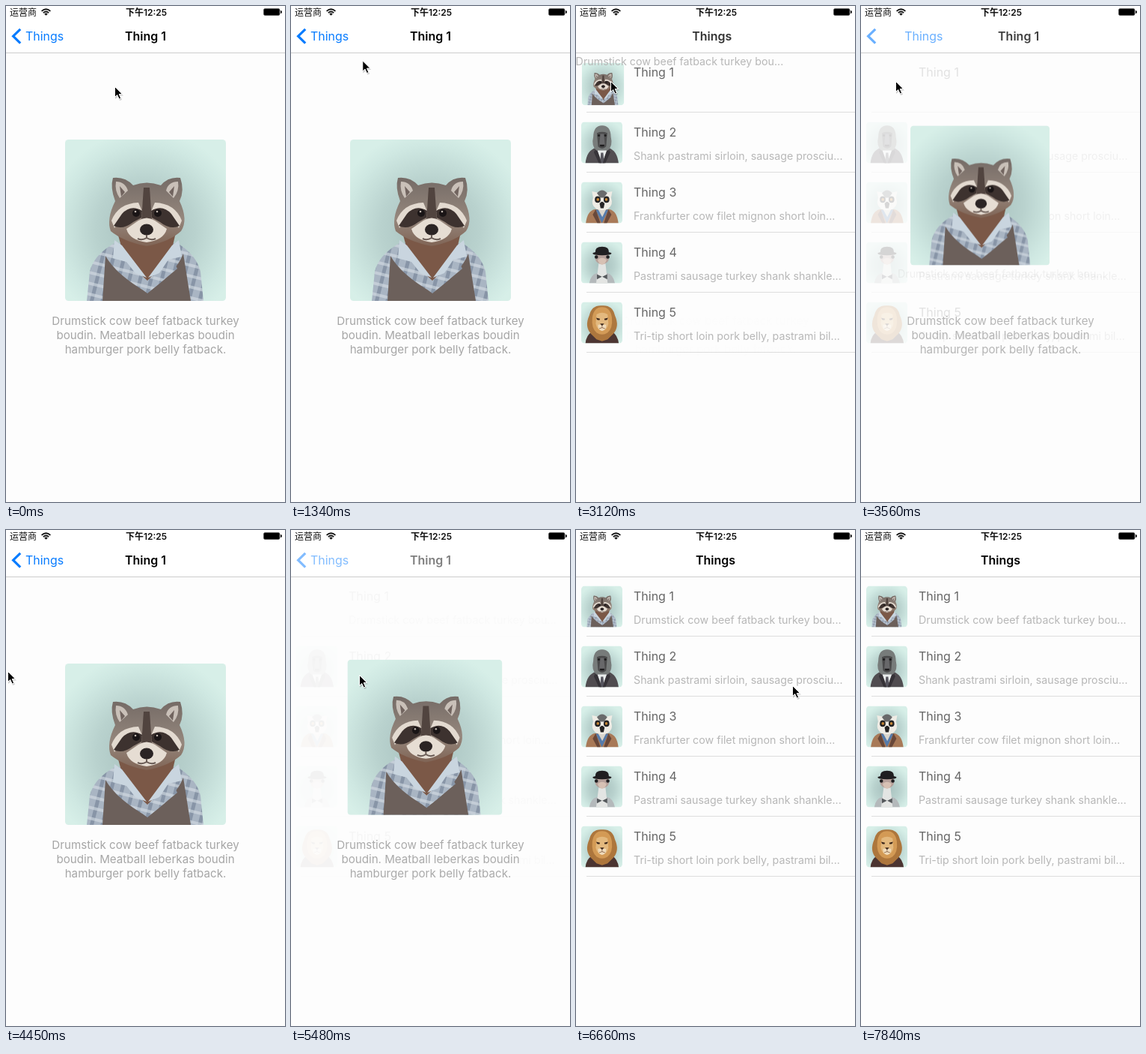
Animation of 373x661 px, one loop 8130 ms. Source, as an HTML page:

```html
<!DOCTYPE html>
<html lang="zh">
<head>
<meta charset="utf-8">
<title>Things</title>
<style>
html, body { margin: 0; width: 100%; height: 100%; overflow: hidden; background: #fdfdfd; }
svg { display: block; }
text { font-family: Inter, "Noto Sans CJK SC", "Noto Sans CJK", sans-serif; white-space: pre; }
.status { font-size: 12px; fill: #111; }
.title { font-size: 16px; font-weight: 600; text-anchor: middle; }
.name { font-size: 16px; fill: #666; }
.sub { font-size: 14.25px; fill: #b7b7b7; }
.desc { font-size: 15.15px; fill: #a6a6a6; text-anchor: middle; }
</style>
</head>
<body>
<svg id="stage" width="373" height="661" viewBox="0 0 373 661">
  <defs>
    <radialGradient id="mint" cx=".5" cy=".56" r=".62">
      <stop offset="0" stop-color="#a5bebc"/>
      <stop offset=".5" stop-color="#b9d2ce"/>
      <stop offset=".85" stop-color="#cfe8e2"/>
      <stop offset="1" stop-color="#d7efe8"/>
    </radialGradient>
    <linearGradient id="fur" x2="0" y2="1">
      <stop offset="0" stop-color="#756b66"/>
      <stop offset=".6" stop-color="#95877d"/>
      <stop offset="1" stop-color="#806455"/>
    </linearGradient>
    <pattern id="plaid" width="14" height="14" patternUnits="userSpaceOnUse" patternTransform="rotate(14)">
      <path fill="#a9b5c3" d="M0 0H14V14H0Z"/>
      <path fill="#7b879b" d="M0 0H5V14H0Z" opacity=".7"/>
      <path fill="#d5dde4" d="M0 8H14V12H0Z" opacity=".6"/>
    </pattern>
    <clipPath id="heroClip"><rect id="heroBox" width="215" height="215"/></clipPath>
    <clipPath id="thumbClip"><rect width="215" height="215" rx="17"/></clipPath>

    <g id="raccoon">
      <path fill="url(#plaid)" d="M66 138Q38 154 33 176L29 215H185L181 176Q176 154 150 138Z"/>
      <path fill="#7b5847" d="M70 124H148L140 158L110 188L80 160Z"/>
      <path fill="#6c605b" d="M54 155Q68 180 110 204Q148 178 158 152L168 215H50Z"/>
      <path fill="url(#plaid)" d="M79 152L110 190L110 205L72 176ZM140 152L110 190V205L150 172Z"/>
      <path fill="#c9d5df" d="M66 134L76 141L109 184L94 178L82 163L64 158ZM152 134L143 141L111 184L126 178L138 160L156 156Z"/>
      <path fill="url(#fur)" d="M64 51Q80 49 91 61Q109 54 128 61Q138 49 154 51Q160 68 153 82Q165 107 155 122Q140 136 109 142Q78 136 61 122Q55 106 67 82Q60 64 64 51Z"/>
      <path fill="#c9c0b8" d="M68 56Q80 56 84 68L73 78Q66 68 68 56ZM151 56Q138 56 135 68L145 78Q153 68 151 56Z"/>
      <path fill="#71645f" d="M73 62L80 70L75 76ZM146 62L139 70L144 76Z"/>
      <path fill="#e3dad0" d="M62 108Q71 85 98 84L104 98Q80 92 66 118ZM156 108Q147 85 120 84L114 98Q138 92 152 118Z"/>
      <path fill="#3d322f" d="M103 95Q88 86 76 99L65 115Q77 121 91 110L102 104ZM115 95Q130 86 142 99L153 115Q141 121 127 110L116 104Z"/>
      <path fill="#51443f" d="M105 64H113L116 108H102Z"/>
      <path fill="#e6ddd3" d="M98 108Q109 101 120 108L136 119Q132 134 109 137Q86 134 82 119Z"/>
      <ellipse fill="#2b2424" cx="109" cy="120" rx="9" ry="7.5"/>
      <path fill="none" stroke="#695b55" stroke-width="2" d="M109 127V131Q103 135 97 132M109 131Q115 135 121 132"/>
      <g fill="#1a1516"><circle cx="95" cy="98" r="5"/><circle cx="124" cy="98" r="5"/></g>
      <g fill="#c3b9b0"><circle cx="94" cy="96" r="1.3"/><circle cx="123" cy="96" r="1.3"/></g>
    </g>

    <g id="baboon">
      <path fill="#504c50" d="M76 134Q28 148 22 215H195Q188 148 142 134Z"/>
      <path fill="#e9ecec" d="M80 136L109 215L138 136Z"/>
      <path fill="#55545d" d="M103 160H115L120 215H98Z"/>
      <path fill="#353237" d="M78 133L106 215H92L66 158ZM140 133L112 215H126L152 158Z"/>
      <path fill="#777b7a" d="M109 18Q154 18 155 78Q166 122 140 148H78Q52 122 63 78Q64 18 109 18Z"/>
      <path fill="#4a4a4b" d="M82 57Q109 46 136 57L130 128Q109 148 88 128Z"/>
      <path fill="#68686a" d="M100 62H118L124 122H94Z"/>
      <g fill="#1c1b1c"><circle cx="92" cy="70" r="6"/><circle cx="126" cy="70" r="6"/><path d="M96 118H122L118 128H100Z"/></g>
    </g>

    <g id="lemur">
      <path fill="#a87957" d="M70 142Q30 152 24 215H194Q188 152 148 142Z"/>
      <path fill="#567baa" d="M76 144L108 215L142 144Z"/>
      <path fill="#d9d5cd" d="M86 138H132L110 182Z"/>
      <path fill="#684739" d="M76 142L100 215H84L60 170ZM142 142L118 215H134L158 170Z"/>
      <path fill="#efece5" d="M56 48L84 54Q109 38 134 54L162 48L156 82Q170 120 139 140Q109 154 79 140Q48 120 62 82Z"/>
      <path fill="#696a6b" d="M82 58Q109 28 136 58L118 82H100Z"/>
      <g fill="#242223"><ellipse cx="86" cy="91" rx="15" ry="17"/><ellipse cx="132" cy="91" rx="15" ry="17"/><path d="M96 112Q109 92 122 112L117 136H101Z"/></g>
      <g fill="#c58535"><circle cx="87" cy="91" r="7"/><circle cx="131" cy="91" r="7"/></g>
    </g>

    <g id="ostrich">
      <path fill="#b4b9bb" d="M82 162Q48 170 42 215H176Q168 170 136 162Z"/>
      <path fill="#e3e5e3" d="M92 104H126L138 215H78Z"/>
      <path fill="#55595c" d="M108 180L82 168V194ZM110 180L136 168V194Z"/>
      <path fill="#b5a09a" d="M76 64H142Q152 92 134 106Q109 126 84 106Q66 92 76 64Z"/>
      <path fill="#d7c1b4" d="M86 92Q109 74 132 92Q126 116 109 118Q92 116 86 92Z"/>
      <g fill="#1f1e20"><circle cx="79" cy="78" r="9"/><circle cx="139" cy="78" r="9"/><path d="M73 57Q70 24 109 24Q148 24 145 57Z"/><ellipse cx="109" cy="59" rx="49" ry="10"/></g>
    </g>

    <g id="lion">
      <path fill="#4b3431" d="M56 155Q26 172 22 215H196Q190 172 162 155Z"/>
      <path fill="#ad763c" d="M109 18Q164 14 176 70Q202 126 167 166L138 194L109 204L80 194L51 166Q16 126 42 70Q54 14 109 18Z"/>
      <path fill="#d39a55" d="M109 26Q152 26 160 80Q166 138 137 160Q109 178 81 160Q52 138 58 80Q66 26 109 26Z"/>
      <path fill="#e3b97e" d="M80 64Q109 46 138 64L142 112Q136 146 109 150Q82 146 76 112Z"/>
      <path fill="#f0dcbc" d="M88 118H130Q132 146 109 150Q86 146 88 118Z"/>
      <g fill="#3a251a"><path d="M78 82L98 87L95 94L83 92ZM140 82L120 87L123 94L135 92ZM98 112H120L109 124Z"/></g>
      <path fill="none" stroke="#77513a" stroke-width="3" d="M109 124V133L94 138M109 133L124 138"/>
    </g>
  </defs>

  <path fill="#fdfdfd" d="M0 0H373V661H0Z"/>
  <g id="list"></g>
  <g id="detail" class="desc">
    <text class="desc" x="186.5" y="425">Drumstick cow beef fatback turkey</text>
    <text class="desc" x="186.5" y="444">boudin. Meatball leberkas boudin</text>
    <text class="desc" x="186.5" y="463">hamburger pork belly fatback.</text>
  </g>
  <g id="hero">
    <g clip-path="url(#heroClip)">
      <path fill="url(#mint)" d="M0 0H215V215H0Z"/>
      <use href="#raccoon"/>
    </g>
  </g>
  <text id="fly" class="sub">Drumstick cow beef fatback turkey bou...</text>

  <path fill="#fff" d="M0 0H373V62H0Z"/>
  <path fill="#cdcdcd" d="M0 62H373V63H0Z"/>
  <g id="back" fill="#087cff">
    <path fill="none" stroke="#087cff" stroke-width="3.2" d="M19.2 30.8L9.6 40.2L19.2 49.6"/>
    <text id="backLabel" x="26" y="46" font-size="15.9">Things</text>
  </g>
  <text id="thing" class="title" x="186.5" y="46">Thing 1</text>
  <text id="things" class="title" x="186.5" y="46">Things</text>

  <text class="status" x="5" y="12.5">运营商</text>
  <g fill="none" stroke="#111" stroke-width="1.8">
    <path d="M47.6 6.9Q53.5 1.6 59.4 6.9M49.8 9.2Q53.5 5.9 57.2 9.2"/>
    <path fill="#111" stroke="none" d="M51.2 10.4Q53.5 8.6 55.8 10.4L53.5 12.8Z"/>
  </g>
  <text class="status" x="187.5" y="12.5" text-anchor="middle" font-weight="600">下午12:25</text>
  <rect x="344.5" y="3.5" width="21.5" height="9" rx="1.8" fill="#000" stroke="#555" stroke-width=".7"/>
  <path fill="#111" d="M367 6Q369 6.2 369 8T367 10Z"/>

  <g id="cursor">
    <path fill="#000" opacity=".18" d="M1 2V17L4.5 14L7 19L10 18L7.6 12.5H12Z"/>
    <path fill="#000" stroke="#fff" stroke-width="1" d="M.5 .5V14.5L3.7 11.5L6.2 17L8.6 16L6.2 10.6H10.6Z"/>
  </g>
</svg>
<script>
const LOOP = 8130, STEP = 147.7, LEAD = 8;
const $ = id => document.getElementById(id);

const rows = [
  ['raccoon', 'Drumstick cow beef fatback turkey bou...'],
  ['baboon', 'Shank pastrami sirloin, sausage prosciu...'],
  ['lemur', 'Frankfurter cow filet mignon short loin...'],
  ['ostrich', 'Pastrami sausage turkey shank shankle...'],
  ['lion', 'Tri-tip short loin pork belly, pastrami bil...']
];

// The first picture is always the hero, so its row stays empty.
$('list').innerHTML = rows.map(([animal, sub], i) => `
  <g transform="translate(0 ${i * 80})">
    ${i ? `<g transform="translate(7 74.6) scale(${55 / 215})" clip-path="url(#thumbClip)">
      <path fill="url(#mint)" d="M0 0H215V215H0Z"/><use href="#${animal}"/></g>` : ''}
    <text class="name" x="77" y="94">Thing ${i + 1}</text>
    <text class="sub" x="77" y="125"${i ? '' : ' id="firstSub"'}>${sub}</text>
    <path fill="#dedede" d="M14 141H373V142H14Z"/>
  </g>`).join('');

// Each key is [step, value, ...]; 0 is the detail page, 1 the list.
const tracks = {
  page: [[0, 0], [12, 0], [13, .22], [14, .58], [15, .9], [16, 1], [20, 1], [21, .99], [22, .85],
    [23, .5], [24, .18], [25, .04], [26, 0], [33, 0], [37, .05], [38, .16], [41, .64], [43, .8], [45, 1]],
  back: [[0, 1], [12, 1], [13, .18], [14, 0], [21, 0], [24, .6], [26, 1], [33, 1], [37, .5], [41, .1], [43, 0]],
  thing: [[0, 1], [12, 1], [13, .5], [15, 0], [21, 0], [25, 1], [33, 1], [37, .5], [41, .3], [45, 0]],
  things: [[0, 0], [12, 0], [13, .2], [16, 1], [20, 1], [21, .8], [24, 0], [37, 0], [41, .38], [45, 1]],
  slide: [[20, 0], [21, .035], [25, 1]],
  cursor: [[0, 145, 107], [3, 145, 107], [4, 143.5, 107], [6, 143.5, 107], [12, 47, 38], [15, 47, 38],
    [18, 46, 100], [25, 46, 100], [28, -16, 188], [29, -16, 188], [30, 2, 188], [31, 2, 188],
    [33, 15, 190], [37, 91, 193], [41, 245, 205], [43, 288, 207], [47, 290, 207], [50, 322, 330], [53, 376, 664]]
};

function sample(keys, k) {
  const j = keys.findIndex(key => key[0] > k);
  if (j < 0) return keys[keys.length - 1].slice(1);
  if (j === 0) return keys[0].slice(1);
  const a = keys[j - 1], b = keys[j], u = (k - a[0]) / (b[0] - a[0]);
  return a.slice(1).map((v, i) => mix(v, b[i + 1], u));
}
const mix = (a, b, u) => a + (b - a) * u;
const move = (id, x, y, s = 1) => $(id).setAttribute('transform', `translate(${x} ${y}) scale(${s})`);
const fade = (id, v) => $(id).setAttribute('opacity', v);

function draw(time) {
  const k = Math.max(0, Math.floor((time - LEAD) / STEP));
  const at = name => sample(tracks[name], k);
  const [p] = at('page'), [slide] = at('slide');
  const pushing = k >= 21 && k < 26;

  fade('list', p);
  fade('detail', 1 - p);
  const scale = mix(215, 55, p) / 215;
  move('hero', mix(79, 7, p), mix(178, 74.6, p), scale);
  $('heroBox').setAttribute('rx', 4.6 / scale);

  fade('fly', pushing ? p : 0);
  move('fly', mix(60, -1, p), mix(425, 75, p));
  fade('firstSub', pushing ? 0 : 1);

  for (const id of ['back', 'thing', 'things']) fade(id, at(id)[0]);
  move('things', pushing ? -134 * slide : 0, 0);
  move('thing', pushing ? 100 * (1 - slide) : 0, 0);
  move('backLabel', pushing ? 134 * (1 - slide) : 0, 0);
  move('cursor', ...at('cursor'));
}

const start = performance.now();
function loop() {
  draw((performance.now() - start) % LOOP);
  requestAnimationFrame(loop);
}
loop();
</script>
</body>
</html>
```
